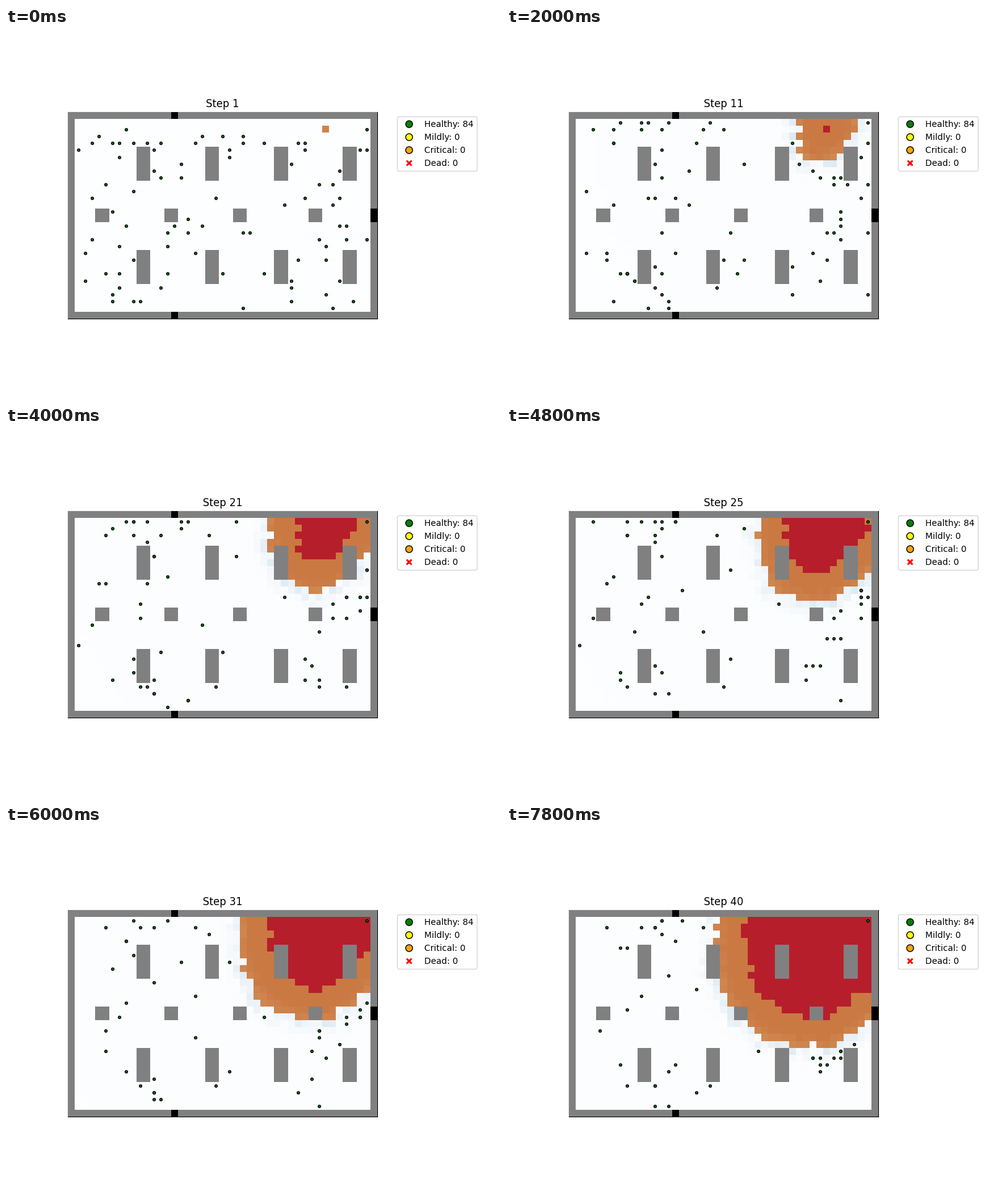
Write a matplotlib script that moves like this. It is 800 by 600 pixels and loops after 8000 ms.

```python
import itertools
import random

import matplotlib.pyplot as plt
import numpy as np
from matplotlib.animation import FuncAnimation
from matplotlib.lines import Line2D

ROWS, COLS, STEPS, PEOPLE = 30, 45, 40, 84
NEVER = 999
BURN_TIME = 10
SPREAD = 0.41  # cells per step
rng = random.Random(7)
noise = np.random.default_rng(3).random((ROWS, COLS))
R, C = np.mgrid[:ROWS, :COLS]

# ---- floor plan --------------------------------------------------------
EXITS = [(15, 0), (44, 14), (44, 15), (15, 29)]
border = (R == 0) | (R == ROWS - 1) | (C == 0) | (C == COLS - 1)
solid = border.copy()
for col in (10, 20, 30, 40):
    solid[5:10, col:col + 2] = True
    solid[20:25, col:col + 2] = True
for col in (4, 14, 24, 35):
    solid[14:16, col:col + 2] = True

plan = np.zeros((ROWS, COLS, 4))
plan[solid] = (0.502, 0.502, 0.502, 1)
for col, row in EXITS:
    plan[row, col] = (0, 0, 0, 1)

# ---- fire --------------------------------------------------------------
SEAT = (37, 2)


def ignition_steps():
    """Step at which each cell catches fire on a ragged, growing front."""
    dx, dy = C - SEAT[0], 0.93 * np.abs(R - SEAT[1])
    # broad shoulders to the left, a pinched flank to the right
    power = np.where(dx > 0, 1.3, 2.6)
    reach = (np.abs(dx) ** power + dy ** power) ** (1 / power)
    ragged = reach + 0.9 * (noise - 0.5) - 0.1
    lit = 1 + np.ceil(np.maximum(ragged, 0.1) / SPREAD)
    lit[SEAT[1], SEAT[0]] = 1
    lit[border] = NEVER
    return lit


LIT = ignition_steps()


def rgb(*values):
    return np.array(values) / 255


AIR, SMOKE = rgb(253, 254, 255), rgb(219, 232, 243)
FRESH, FLAME, EMBER = rgb(209, 137, 82), rgb(202, 121, 67), rgb(183, 30, 43)


def blend(a, b, amount):
    return a + (b - a) * amount[..., None]


def distance(mask):
    """Distance of every cell to the nearest cell of the mask."""
    rows, cols = np.nonzero(mask)
    return np.hypot(R[..., None] - rows, C[..., None] - cols).min(-1)


def fire_picture(step):
    burning = LIT <= step
    haze = np.exp(1.2 * (1 - distance(burning))) * (0.1 + 0.8 * (1 - noise))
    picture = blend(AIR, SMOKE, np.clip(haze, 0, 1) * min(1, (step - 1) / 8))
    glow = np.clip((step - LIT) / 5 + 0.8 * noise, 0, 1)
    picture[burning] = blend(FRESH, FLAME, glow)[burning]
    picture[LIT + BURN_TIME <= step] = EMBER
    return picture


# ---- people ------------------------------------------------------------
MOVES = list(itertools.product((-1, 0, 1), repeat=2))
FREE = [(c, r) for r in range(ROWS) for c in range(COLS) if not solid[r, c]]


def neighbours(cell):
    return [(cell[0] + dx, cell[1] + dy) for dx, dy in MOVES]


def exit_distance():
    """Moves from every free cell to the nearest exit."""
    open_cells = set(FREE)
    found = dict.fromkeys(EXITS, 0)
    queue = list(EXITS)
    for cell in queue:
        for n in neighbours(cell):
            if n in open_cells and n not in found:
                found[n] = found[cell] + 1
                queue.append(n)
    return found


FAR = exit_distance()


def lit_at(cell):
    return LIT[cell[1], cell[0]]


def walk(cell):
    """Wander at random, now and then towards an exit, clear of the fire."""
    haste = rng.uniform(0, 0.6)
    path = [cell]
    for step in range(2, STEPS + 1):
        near = [n for n in neighbours(cell) if n in FAR]
        safe = [n for n in near if lit_at(n) > step + 3]
        if not safe:
            cell = max(near, key=lit_at)
        elif rng.random() < haste:
            cell = min(safe, key=FAR.get)
        else:
            cell = rng.choice(safe)
        if cell in EXITS:
            break
        path.append(cell)
    return path


starts = rng.sample([cell for cell in FREE if lit_at(cell) > 6], PEOPLE)
paths = [walk(cell) for cell in starts]

# ---- figure ------------------------------------------------------------
fig, ax = plt.subplots(figsize=(8, 6), dpi=100)
fig.subplots_adjust(left=0.125, right=0.75, bottom=0.11, top=0.88)
ground = ax.imshow(fire_picture(1), interpolation="nearest")
ax.imshow(plan, interpolation="nearest", zorder=3)
ax.set_xticks([])
ax.set_yticks([])
people, = ax.plot([], [], "o", ms=3, mfc="green", mec="black", mew=1, zorder=4)
title = ax.set_title("Step 1")


def key(label, color, marker="o", edge="black"):
    return Line2D([0], [0], color="w", marker=marker, markersize=8,
                  markerfacecolor=color, markeredgecolor=edge, label=label)


ax.legend(handles=[key(f"Healthy: {PEOPLE}", "green"),
                   key("Mildly: 0", "yellow"),
                   key("Critical: 0", "orange"),
                   key("Dead: 0", "red", "X", "white")],
          loc="upper left", bbox_to_anchor=(1.05, 1))


def draw(i):
    ground.set_data(fire_picture(i + 1))
    here = [path[i] for path in paths if i < len(path)]
    people.set_data([c for c, _ in here], [r for _, r in here])
    title.set_text(f"Step {i + 1}")
    return ground, people, title


anim = FuncAnimation(fig, draw, frames=STEPS, interval=200, repeat=True,
                     repeat_delay=0, blit=False)
plt.show()
```
